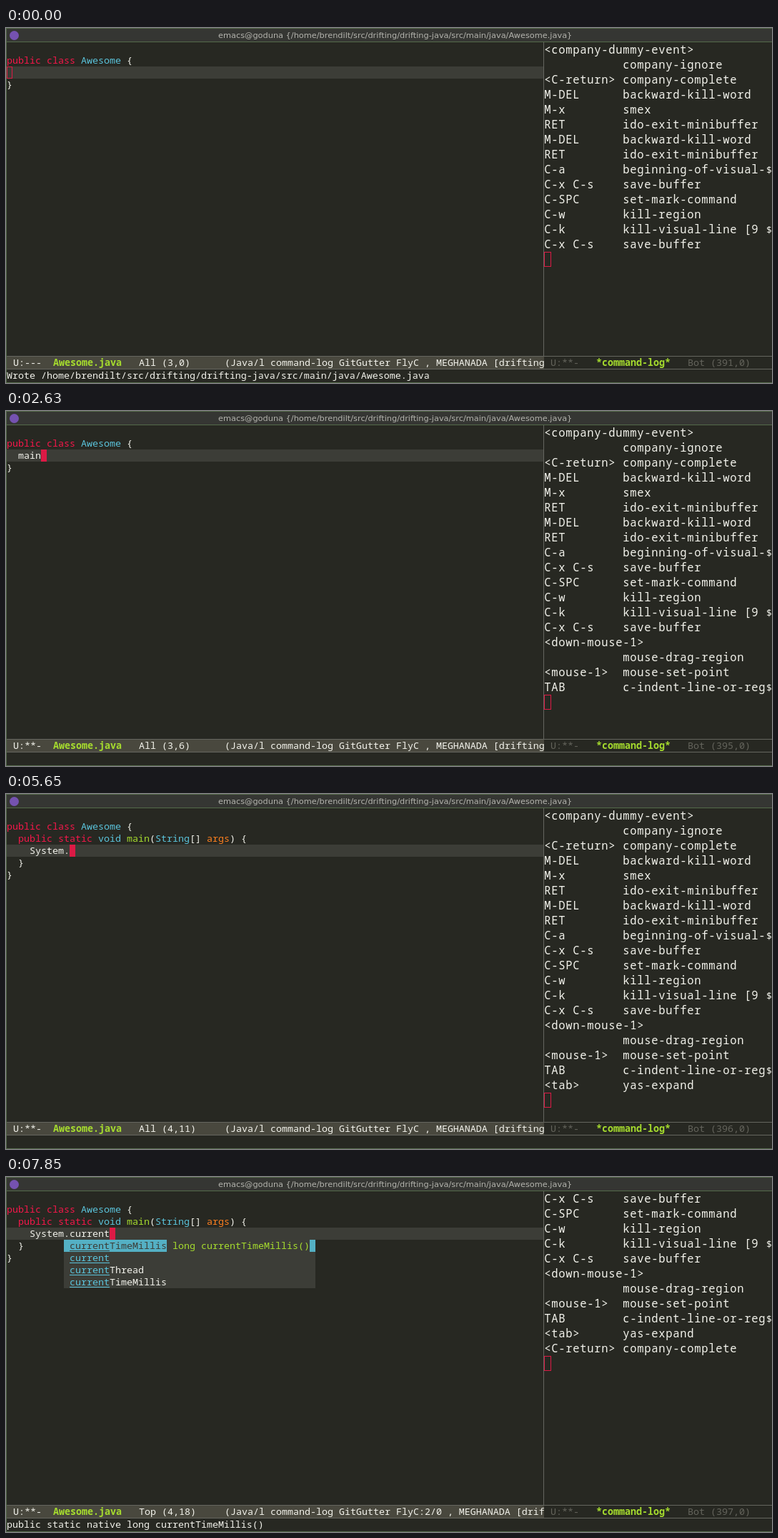
Write an HTML page with a canvas that moves like this. It is 1072x498 px and loops after 8000 ms.

```html
<!DOCTYPE html>
<html lang="en">
<head>
<meta charset="utf-8">
<title>Editor session</title>
<style>
  html, body { margin: 0; width: 100%; height: 100%; overflow: hidden; background: #272822; }
  canvas { display: block; }
</style>
</head>
<body>
<canvas id="stage" width="1072" height="498"></canvas>
<script>
const ctx = document.getElementById('stage').getContext('2d');
const LOOP = 8000;
const MONO = '"Noto Sans Mono", "DejaVu Sans Mono", monospace';
const SMALL = `13.333px ${MONO}`;
const BOLD = `bold 13.333px ${MONO}`;
const LARGE = `15.5px ${MONO}`;
const TITLE = '11.33px "DejaVu Sans", sans-serif';
const CW = 8, RH = 17;

const C = {
  bg: '#272822', line: '#3c3d37', text: '#f3f3ec', red: '#f5174a', cursor: '#dc1a45',
  blue: '#5bc4dc', pick: '#54b0c4', green: '#a6dc2e', orange: '#fd7f1f',
  mode: '#49483e', dim: '#64645c', rule: '#65665f', frame: '#54694a',
  bar: '#353633', title: '#b4b4ae', thumb: '#7a6f58', track: '#62645e'
};

const PATH = '/home/brendilt/src/drifting/drifting-java/src/main/java/Awesome.java';

const LOG = [
  ['<company-dummy-event>', ''],
  ['', 'company-ignore'],
  ['<C-return>', 'company-complete'],
  ['M-DEL', 'backward-kill-word'],
  ['M-x', 'smex'],
  ['RET', 'ido-exit-minibuffer'],
  ['M-DEL', 'backward-kill-word'],
  ['RET', 'ido-exit-minibuffer'],
  ['C-a', 'beginning-of-visual-line'],
  ['C-x C-s', 'save-buffer'],
  ['C-SPC', 'set-mark-command'],
  ['C-w', 'kill-region'],
  ['C-k', 'kill-visual-line [9 times]'],
  ['C-x C-s', 'save-buffer'],
  ['<down-mouse-1>', ''],
  ['', 'mouse-drag-region'],
  ['<mouse-1>', 'mouse-set-point'],
  ['TAB', 'c-indent-line-or-region'],
  ['<tab>', 'yas-expand'],
  ['<C-return>', 'company-complete']
];

const MEMBERS = [
  ['arraycopy', 'void arraycopy(Object arg0, int arg1, Object arg2, int arg3, int arg4)'],
  ['clearProperty', 'String clearProperty(String arg0)'],
  ['console', 'Console console()'],
  ['currentTimeMillis', 'long currentTimeMillis()'],
  ['err', 'PrintStream err'],
  ['exit', 'void exit(int status)'],
  ['gc', 'void gc()'],
  ['getProperties', 'Properties getProperties()'],
  ['getProperty', 'String getProperty(String arg0)'],
  ['getProperty', 'String getProperty(String arg0, String arg1)']
];
const MATCHES = [MEMBERS[3], ['current', ''], ['currentThread', ''], ['currentTimeMillis', '']];

// Timeline: each step merges its changes into the state.
const steps = [
  [0, { hollow: true, on: true, row: 3, col: 0, typed: '', method: false, pos: '(3,0)',
        flag: '---', where: 'All', fly: 'FlyC', log: 14, top: 0, popup: null, match: 0,
        echo: 'Wrote ' + PATH }],
  [920, { hollow: false, echo: '' }],
  [1040, { log: 16 }],
  [1240, { log: 17 }],
  [1500, { flag: '**-', pos: '(3,2)', col: 2 }],
  [1540, { log: 18 }]
];
const add = (t, change) => steps.push([t, change]);

// The status line follows a key at once, the text a moment later.
function type(row, indent, text, times, done = '') {
  times.forEach((t, i) => {
    const typed = done + text.slice(0, i + 1);
    const col = indent + typed.length;
    add(t, { pos: `(${row},${col})` });
    add(t + 40, { typed, col, on: true, match: typed.length - 7 });
  });
}

type(3, 2, 'main', [2020, 2080, 2150, 2510]);
add(2860, { method: true, typed: '', row: 4, col: 4, pos: '(4,4)', fly: 'FlyC*' });
add(2900, { log: 19 });
add(3430, { on: false, fly: 'FlyC' });
add(3910, { on: true });
add(4410, { on: false });
type(4, 4, 'System.curr',
  [4910, 5120, 5220, 5310, 5410, 5510, 5610, 5810, 5910, 6010, 6190]);
add(6610, { where: 'Top' });
add(6650, { log: 20, top: 9 });
add(6690, { popup: MEMBERS, fly: 'FlyC:2/0', echo: 'public static native ' + MEMBERS[0][1] });
add(7100, { on: false });
add(7600, { popup: MATCHES, echo: 'public static native ' + MATCHES[0][1] });
type(4, 4, 'ent', [7560, 7690, 7810], 'System.curr');
steps.sort((a, b) => a[0] - b[0]);

function stateAt(t) {
  const s = {};
  for (const [at, change] of steps) if (at <= t) Object.assign(s, change);
  return s;
}

function box(x, y, w, h, color) {
  ctx.fillStyle = color;
  ctx.fillRect(x, y, w, h);
}

function put(str, x, y, color, font = SMALL) {
  ctx.font = font;
  ctx.fillStyle = color;
  ctx.fillText(str, x, y);
}

// Large text, one character per 10 px cell.
function putLarge(str, x, y) {
  ctx.letterSpacing = '0.7px';
  put(str, x + .35, y, C.text, LARGE);
  ctx.letterSpacing = '0px';
}

// Draws [text, color] runs on the character grid.
function runs(parts, x, top) {
  for (const [str, color, font] of parts) {
    put(str, x, top + 13, color, font);
    x += str.length * CW;
  }
}

function clip(x, y, w, h, draw) {
  ctx.save();
  ctx.beginPath();
  ctx.rect(x, y, w, h);
  ctx.clip();
  draw();
  ctx.restore();
}

const rowTop = n => 20 + (n - 1) * RH;

function drawFrame() {
  box(0, 0, 1072, 498, C.bg);
  box(0, 0, 1072, 19, C.bar);
  box(0, 0, 1072, 1, C.frame);
  box(0, 19, 1072, 1, C.frame);
  box(0, 0, 1, 498, C.frame);
  box(0, 497, 1072, 1, C.frame);
  ctx.fillStyle = '#7552b0';
  ctx.beginPath();
  ctx.arc(11.5, 10.5, 6.5, 0, 7);
  ctx.fill();
  put(`emacs@goduna {${PATH}}`, 297, 14, C.title, TITLE);
}

function drawCode(s) {
  const top = rowTop(s.row);
  box(1, top, 751, RH, C.line);
  runs([['public class ', C.red], ['Awesome', C.blue], [' {', C.text]], 1, rowTop(2));
  if (s.method) {
    runs([['  public static ', C.red], ['void ', C.blue], ['main', C.green], ['(', C.text],
          ['String', C.blue], ['[] ', C.text], ['args', C.orange], [') {', C.text]], 1, rowTop(3));
    runs([['  }', C.text]], 1, rowTop(5));
  }
  runs([['}', C.text]], 1, rowTop(s.method ? 6 : 4));
  runs([[s.typed, C.text]], s.method ? 33 : 17, top);

  const x = 1 + s.col * CW;
  if (s.hollow) outline(x, top, CW, RH);
  else if (s.on) box(x, top, CW, RH, C.cursor);
}

function outline(x, y, w, h) {
  ctx.strokeStyle = C.cursor;
  ctx.lineWidth = 1;
  ctx.strokeRect(x + .5, y + .5, w - 1, h - 1);
}

function drawPopup(s) {
  const list = s.popup, x = 81, y = 88;
  const long = list === MEMBERS;
  const [name, note] = list[0];
  const width = (name.length + note.length + 3) * CW;
  box(x, y, width, list.length * RH, C.line);
  box(x, y, (name.length + 1) * CW, RH, C.pick);
  box(x + width - CW, y, CW, RH, C.pick);
  if (long) {
    box(x + width, y, CW, list.length * RH, C.track);
    box(x + width, y, CW, 68, C.thumb);
  }
  list.forEach(([word, info], i) => {
    const top = y + i * RH;
    const n = long ? 0 : s.match;
    const lead = i ? C.blue : C.line;
    runs([[word.slice(0, n), lead], [word.slice(n), i ? C.text : C.line],
          [' ' + info, C.green]], x + CW, top);
    if (n) box(x + CW, top + 15, n * CW, 1, lead);
  });
}

function drawLog(s) {
  const lines = LOG.slice(s.top, s.log);
  lines.forEach(([keys, command], i) => {
    const y = 36 + i * 21;
    putLarge(keys, 753, y);
    putLarge(command.slice(0, 20), 863, y);
    if (command.length > 20) put('$', 1064, y, C.text);
  });
  outline(753, 20 + lines.length * 21, 10, 21);
}

function drawStatus(s) {
  box(752, 20, 1, 441, C.rule);
  box(1, 461, 752, 17, C.mode);
  box(1, 460, 1071, 1, C.rule);
  box(1, 478, 1071, 1, C.rule);
  clip(1, 461, 752, 17, () => runs([
    [` U:${s.flag}  `, C.text], ['Awesome.java', C.green, BOLD],
    ['   ' + `${s.where} ${s.pos}`.padEnd(15), C.text],
    [`(Java/l command-log GitGutter ${s.fly} , MEGHANADA [drifting`, C.text]
  ], 2, 461));
  runs([[' U:**-   ', C.dim], ['*command-log*', C.green, BOLD],
        [`   Bot (${377 + s.log},0)`, C.dim]], 754, 461);
  runs([[s.echo, C.text]], 1, 479);
}

function draw(now) {
  const s = stateAt(now % LOOP);
  drawFrame();
  drawCode(s);
  if (s.popup) drawPopup(s);
  drawLog(s);
  drawStatus(s);
}

let start = null;
function tick(now) {
  if (start === null) start = now;
  draw(now - start);
  requestAnimationFrame(tick);
}
draw(0);
requestAnimationFrame(tick);
</script>
</body>
</html>
```
